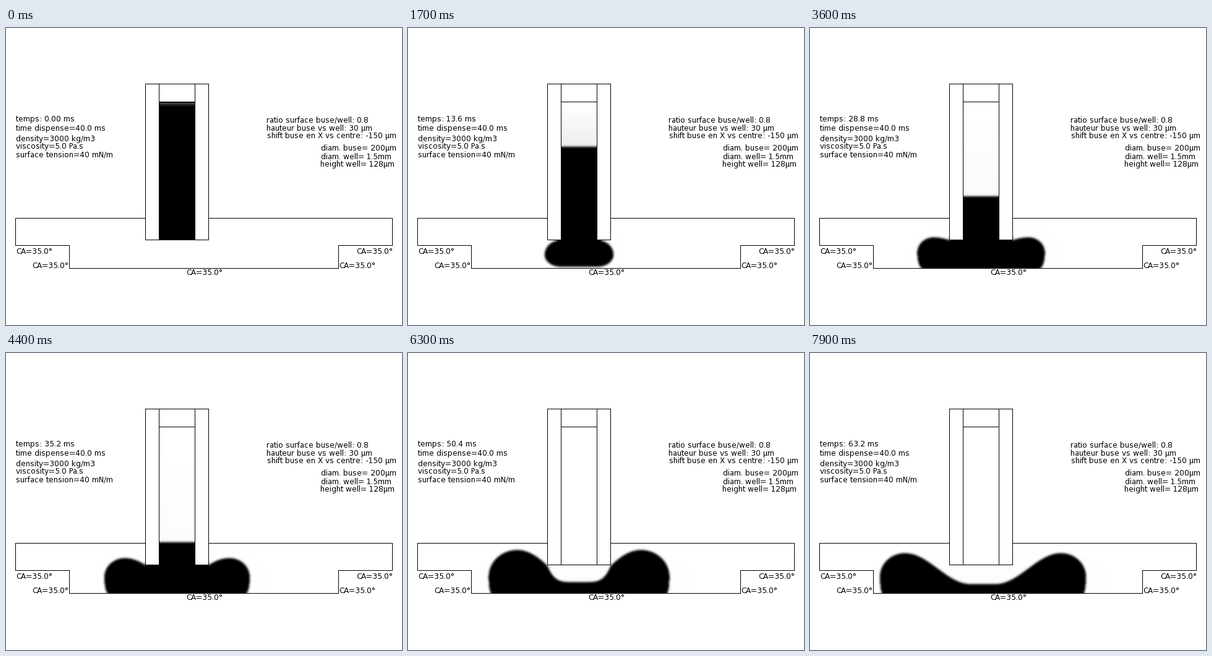
Recreate the animation shown at these times as a matplotlib script. Size 640 px wide and 480 px high, loop 8 s.

```python
import numpy as np
import matplotlib.pyplot as plt
from matplotlib.animation import FuncAnimation

W, H, DPI = 640, 480, 100
FRAMES, STEP = 80, 0.1                   # frame length in seconds
X0, X1, Y0, Y1 = 103, 537, 100, 405      # window holding the liquid
AXIS, BORE, WALL = 276.5, 29, 51         # nozzle axis, inner and outer half widths
RIM, TIP, TOP, FLOOR = 120, 343, 308, 388
EMPTY = 5.25                             # the column has run out

plt.rcParams["text.hinting_factor"] = 1  # whole-pixel letter spacing

x = np.arange(X0, X1) + 0.5
y = np.arange(Y0, Y1)[:, None] + 0.5
gap = np.abs(x - AXIS)
bore = (gap < BORE) & (y > RIM) & (y < TIP)
outside = (y > TOP) & (y < FLOOR) & ((gap > WALL) | (y > TIP))


def ramp(t, start, end):
    return np.clip((t - start) / (end - start), 0, 1)


def wave(u):
    return (1 - np.cos(np.pi * u)) / 2


def arc(u):
    """Quarter circle: 1 at u = 0, 0 at u = 1."""
    return np.sqrt(np.clip(1 - u * u, 0, 1))


def radius(t):
    """Half width of the drop: a slow bulge, then square-root spreading."""
    return max(29 + 4.5 * min(t, 1), 63 * np.sqrt(max(t - 0.92, 0)))


def column_level(t):
    return RIM + 42.2 * t


def drop(t):
    """Upper and lower surface of the liquid for every column of the window."""
    r = np.abs(x - AXIS - 1.9 * max(t - 6.3, 0))
    R = radius(t)
    wet = ramp(t, 1.7, 2.2)
    base = TIP + 43.5 * (1 - np.exp(-t / 0.4)) + 2 * wet
    mid = min(361 + 16 * np.exp(-t / 1.7), TIP + 0.55 * (base - TIP))
    crest = TIP - 25 * wave(max(t - 2.4, 0) / 4.2)
    rx = 1.07 * (mid - crest)
    cx = R - rx

    # inside the crest: a slope to the nozzle corner and a hollow below the bore
    depth = 30.5 * (1 - np.exp(-max(t - EMPTY, 0) / 0.47))
    width = BORE + (WALL - BORE) * ramp(t, 5.4, 6.3)
    slope = crest + (TIP - crest) * np.clip((cx - r) / max(cx - WALL, 1), 0, 1) ** 2
    hollow = depth * np.clip(1 - (r / width) ** 5, 0, 1)
    pinned = np.where(r < WALL, TIP + hollow, slope)
    pinned[(r < WALL) & (hollow < 0.5)] -= 6          # stay in touch with the rim
    valley = crest + (TIP + depth - crest) * wave(np.clip((cx - r) / (cx - 20), 0, 1))
    free = ramp(t, 6.1, 7.9)
    inner = pinned + free * (valley - pinned) if free else pinned

    upper = np.where(r < cx, inner, mid - (mid - crest) * arc((r - cx) / rx))
    if t < EMPTY:
        upper[gap < BORE + 7] = column_level(t)

    inset = 4 + 22 * np.exp(-max(t - 1.7, 0) / 1.2)
    foot = R - inset
    lower = np.where(r < foot, base + 10 * wet, mid + (base - mid) * arc((r - foot) / inset))
    upper[r > R] = Y1
    return upper, lower


def blur(a, sigma=1.7, n=6):
    k = np.exp(-0.5 * (np.arange(-n, n + 1) / sigma) ** 2)
    k /= k.sum()
    for axis in (0, 1):
        a = sum(w * np.roll(a, i - n, axis=axis) for i, w in enumerate(k))
    return a


def shade(t):
    """Grey levels of the window at time t."""
    if t == 0:
        stripes = (y > RIM + 1) & (y < RIM + 5) & (np.floor(y) != RIM + 3)
        return 1 - bore * (1 - 0.3 * stripes)
    upper, lower = drop(t)
    ink = blur(np.clip(y - upper + 0.5, 0, 1) * np.clip(lower - y + 0.5, 0, 1))

    # faint vapour above the column and around the drop
    rise = np.clip((y - RIM) / (min(column_level(t), TIP) - RIM), 0, 1)
    halo = np.exp(-0.5 * (((x - AXIS - 8) / (0.8 * radius(t))) ** 2 + ((y - 365) / 40) ** 2))
    haze = np.where(bore, 0.2 * np.exp(-t / 1.6) * rise, 0.012 * halo)
    return np.where(bore | outside, (1 - haze) * (1 - ink), 1)


fig = plt.figure(figsize=(W / DPI, H / DPI), dpi=DPI, facecolor="white")
ax = fig.add_axes([0, 0, 1, 1])
img = ax.imshow(shade(0), cmap="gray", vmin=0, vmax=1, interpolation="nearest",
                extent=(X0, X1, Y1, Y0), aspect="auto")
ax.set_xlim(0, W)
ax.set_ylim(H, 0)
ax.axis("off")


def line(*pts):
    ax.plot(*zip(*pts), color="black", lw=0.72, solid_capstyle="projecting",
            solid_joinstyle="miter", antialiased=False)


def label(x, y, s):
    return ax.text(x, y, s, family="DejaVu Sans", size=12 * 72 / DPI,
                   color="black", va="baseline", ha="left")


line((225, 90), (327, 90), (327, 342), (225, 342), (225, 90))
line((247, 90), (247, 342))
line((305, 90), (305, 342))
line((247, 119), (305, 119))
line((225, 307), (15, 307), (15, 351), (102, 351), (102, 388),
     (537, 388), (537, 351), (624, 351), (624, 307), (327, 307))

clock = label(16, 151, "")
label(16, 166, "time dispense=40.0 ms")
label(16, 183, "density=3000 kg/m3")
label(16, 195, "viscosity=5.0 Pa.s")
label(16, 208, "surface tension=40 mN/m")
label(421, 152, "ratio surface buse/well: 0.8")
label(421, 166, "hauteur buse vs well: 30 µm")
label(422, 178, "shift buse en X vs centre: -150 µm")
label(509, 198, "diam. buse= 200µm")
label(509, 212, "diam. well= 1.5mm")
label(508, 224, "height well= 128µm")
for pos in [(16, 365), (42, 388), (291, 399), (566, 365), (538, 388)]:
    label(*pos, "CA=35.0°")


def update(i):
    ms = 0.8 * i
    clock.set_text(f"temps: {ms:.{2 if ms < 10 else 1}f} ms")
    img.set_data(shade(i * STEP))
    return img, clock


anim = FuncAnimation(fig, update, frames=FRAMES, interval=1000 * STEP,
                     repeat=True, repeat_delay=0)
plt.show()
```
